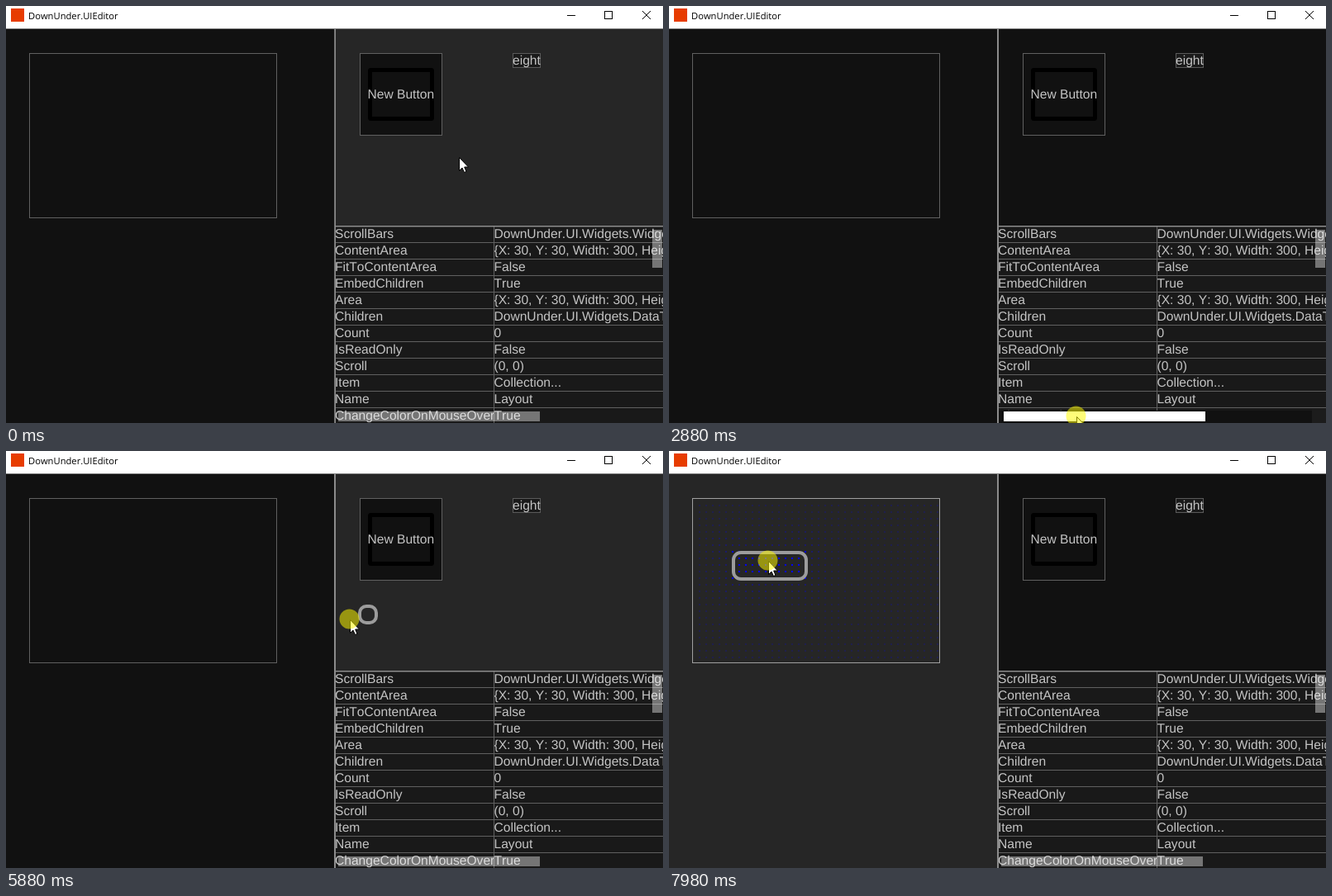
Recreate the animation shown at these times as an HTML page with a canvas. Size 795 by 505 pixels, loop 8 s.

```html
<!DOCTYPE html>
<html lang="en">
<head>
<meta charset="utf-8">
<title>UI editor</title>
<style>
  html, body { margin: 0; width: 100%; height: 100%; overflow: hidden; background: #111; }
  canvas { display: block; }
</style>
</head>
<body>
<canvas id="stage" width="795" height="505"></canvas>
<script>
const ctx = document.getElementById('stage').getContext('2d');
ctx.fontKerning = 'none';
ctx.textRendering = 'geometricPrecision';

const LOOP = 8000;
const FONT = '15.6px "Liberation Sans", Arial, sans-serif';
const LINE = '#8c8c8c';
const GRID = 8, GRID_X = 36, GRID_Y = 65;

const ROWS = [
  ['ScrollBars', 'DownUnder.UI.Widgets.WidgetScrollBars'],
  ['ContentArea', '{X: 30, Y: 30, Width: 300, Height: 200}'],
  ['FitToContentArea', 'False'],
  ['EmbedChildren', 'True'],
  ['Area', '{X: 30, Y: 30, Width: 300, Height: 200}'],
  ['Children', 'DownUnder.UI.Widgets.DataTypes.WidgetList'],
  ['Count', '0'],
  ['IsReadOnly', 'False'],
  ['Scroll', '(0, 0)'],
  ['Item', 'Collection...'],
  ['Name', 'Layout'],
  ['ChangeColorOnMouseOver', 'True']
];

// Pointer moves: start, end, x and y reached; it rests in between
const MOVES = [
  [180, 970, 505, 481], [1000, 1240, 505, 504], [1750, 2380, 588, 500],
  [2540, 2860, 493, 497], [2900, 3330, 387, 233], [3350, 4030, 476, 112],
  [4320, 4600, 484, 106], [5130, 5280, 501, 80], [5280, 5840, 441, 198],
  [5840, 5880, 417, 204], [5880, 5940, 345, 211], [5940, 6640, 219, 188],
  [6640, 6720, 202, 187], [6820, 7400, 138, 163], [7770, 7980, 120, 133]
];

const clamp = v => Math.min(1, Math.max(0, v));
const ramp = (t, from, to) => clamp((t - from) / (to - from));
const mix = (a, b, f) => a + (b - a) * f;
const snap = (v, origin) => origin + Math.round((v - origin) / GRID) * GRID;

function pointer(t) {
  let x = 548, y = 183;
  for (const [from, to, nextX, nextY] of MOVES) {
    const f = ramp(t, from, to);
    x = mix(x, nextX, f);
    y = mix(y, nextY, f);
  }
  return { x, y };
}

// How far the horizontal scroll bar has been pulled
const pull = t => t > 1750 && t < 3000 ? Math.max(0, pointer(t).x - 505) : 0;

function grey(from, to, amount) {
  const v = Math.round(mix(from, to, amount));
  return `rgb(${v},${v},${v})`;
}

function fill(color, x, y, w, h) {
  ctx.fillStyle = color;
  ctx.fillRect(x, y, w, h);
}

function outline(color, x, y, w, h) {
  ctx.strokeStyle = color;
  ctx.lineWidth = 1;
  ctx.strokeRect(x + 0.5, y + 0.5, w - 1, h - 1);
}

function roundFrame(color, width, x, y, w, h, radius) {
  ctx.strokeStyle = color;
  ctx.lineWidth = width;
  ctx.beginPath();
  ctx.roundRect(x + width / 2, y + width / 2, w - width, h - width, radius);
  ctx.stroke();
}

function text(str, x, y, color = '#c4c4c4', font = FONT) {
  ctx.fillStyle = color;
  ctx.font = font;
  ctx.fillText(str, x, y);
}

function drawTitleBar() {
  fill('#fff', 0, 0, 795, 27);
  fill(LINE, 0, 27, 795, 1);
  fill('#e73c00', 6, 3, 16, 16);
  text('DownUnder.UIEditor', 27, 16, '#000', '11.2px "Open Sans", "Noto Sans", sans-serif');
  fill('#000', 679, 11, 10, 1);
  outline('#000', 724, 6, 10, 10);
  ctx.beginPath();
  ctx.moveTo(770, 6); ctx.lineTo(780, 16);
  ctx.moveTo(780, 6); ctx.lineTo(770, 16);
  ctx.stroke();
}

function drawEditor(t) {
  const hover = ramp(t, 5890, 6450);
  fill(grey(17, 38, hover), 0, 27, 397, 478);
  outline(grey(96, 160, hover), 28, 57, 300, 200);
}

function drawPalette(t) {
  const hover = 1 - ramp(t, 400, 1000) + ramp(t, 3330, 4000) - ramp(t, 5890, 6450);
  const button = ramp(t, 3700, 4500) - ramp(t, 5300, 5800);
  fill(grey(17, 38, hover), 399, 27, 396, 239);
  fill(grey(17, 38, button), 428, 57, 100, 100);
  outline(grey(96, 165, button), 428, 57, 100, 100);
  roundFrame('#000', 5, 438, 75, 80, 64, 1);
  text('New Button', 437.5, 112);
  fill('#1a1a1a', 613, 57, 34, 18);
  outline('#5a5a5a', 613, 57, 34, 18);
  text('eight', 613, 71);
}

function drawTable(t) {
  const left = 398 - Math.round(pull(t) * 1.6);
  const thumb = 402 + Math.round(pull(t - 70));
  const glow = ramp(t, 1000, 1470) - ramp(t, 2950, 3600);

  ctx.save();
  ctx.beginPath();
  ctx.rect(398, 266, 397, 239);
  ctx.clip();
  fill('#191919', 398, 266, 397, 239);
  ROWS.forEach(([name, value], i) => {
    const y = 266 + i * 20;
    fill('#606060', 398, y, 397, 1);
    text(name, left, y + 15);
    text(value, left + 192.5, y + 15);
  });
  fill('#606060', left + 192, 266, 1, 239);

  ctx.globalAlpha = glow;
  fill('#111', 399, 490, 379, 15);
  fill('#1c1c1c', 778, 488, 17, 17);
  ctx.globalAlpha = 1;
  fill('rgba(255,255,255,.4)', 782, 271, 12, 46);
  fill(`rgba(255,255,255,${mix(0.4, 1, glow)})`, thumb, 491, 244, 12);
  ctx.restore();
  fill(LINE, 398, 266, 397, 1.5);
  fill(LINE, 397.5, 27, 1.5, 478);
}

// Blue dots, strongest below the widget and fading within 32 px of it
function drawGrid(left, top, strength) {
  for (let x = GRID_X; x < 326; x += GRID) {
    for (let y = GRID_Y; y < 250; y += GRID) {
      const dx = Math.max(left - x, x - left - 88, 0);
      const dy = Math.max(top - y, y - top - 32, 0);
      const near = 1 - clamp(Math.hypot(dx, dy) / 40);
      const alpha = dx + dy === 0 ? 1 : mix(0.18, 0.35, near);
      fill(`rgba(0,0,255,${alpha * strength})`, x, y, 2, 2);
    }
  }
}

// The dragged widget trails the pointer and, in the editor, sticks to the grid
function drawGhost(t) {
  if (t < 5180) return;
  const grow = ramp(t, 5890, 6150);
  const w = mix(24, 92, grow), h = mix(24, 36, grow);
  const inEditor = t > 5940;
  const place = lag => {
    const p = pointer(t - lag), x = p.x - w / 2, y = p.y - h / 2;
    return inEditor ? { x: snap(x, GRID_X), y: snap(y, GRID_Y) } : { x, y };
  };
  const trail = [20, 30, 40, 50, 60].map(place);
  const mean = axis => Math.round(trail.reduce((sum, p) => sum + p[axis], 0) / trail.length);
  const x = mean('x'), y = mean('y');

  if (inEditor) drawGrid(snap(x, GRID_X), snap(y, GRID_Y), ramp(t, 5940, 6500));
  roundFrame('#9c9c9c', 4, x, y, w, h, Math.min(9, w / 3));
}

function drawPointer(t) {
  const p = pointer(t), x = Math.round(p.x), y = Math.round(p.y);
  ctx.save();
  ctx.translate(x, y);
  ctx.beginPath();
  [[0.5, 0.5], [0.5, 16.5], [4, 13], [6.5, 18.5], [9, 17.5], [6.7, 12], [11.5, 12]]
    .forEach(([px, py]) => ctx.lineTo(px, py));
  ctx.closePath();
  ctx.fillStyle = '#fff';
  ctx.fill();
  ctx.strokeStyle = '#000';
  ctx.lineWidth = 1;
  ctx.stroke();
  ctx.restore();

  const pressed = (t >= 1750 && t < 2950) || t >= 4840;
  if (!pressed) return;
  ctx.fillStyle = 'rgba(255,250,0,.53)';
  ctx.beginPath();
  ctx.arc(x - 0.5, y - 0.5, 12, 0, Math.PI * 2);
  ctx.fill();
}

const start = performance.now();
function frame() {
  const t = (performance.now() - start) % LOOP;
  drawEditor(t);
  drawPalette(t);
  drawTable(t);
  drawTitleBar();
  drawGhost(t);
  drawPointer(t);
  requestAnimationFrame(frame);
}
frame();
</script>
</body>
</html>
```
